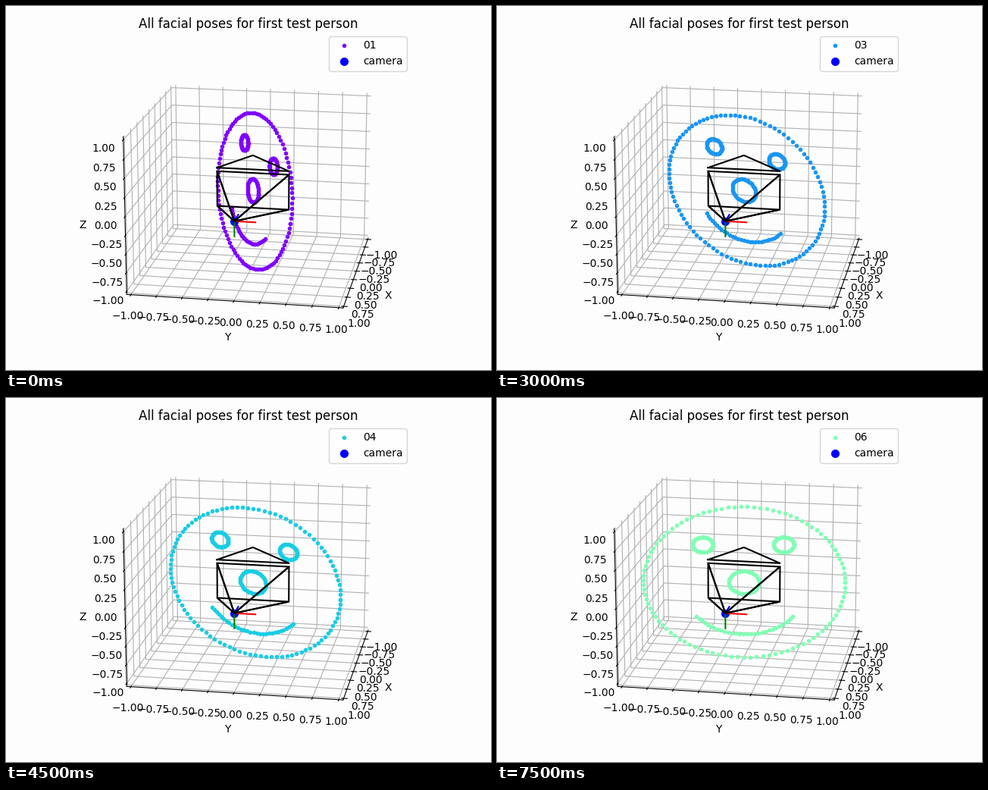
Write a matplotlib script that moves like this. It is 640 by 480 pixels and loops after 8 s.

```python
import numpy as np
import matplotlib.pyplot as plt
from matplotlib.animation import FuncAnimation

W, H, DPI = 640, 480, 100
STEP_MS, STEPS, HOLD = 500, 16, 3
BACK = "#fdfdfd"

# yaw in degrees, pitch and roll in radians
POSES = [
    (59.2, 0.10, -0.050),
    (42.3, 0.03, -0.029),
    (29.8, 0.015, -0.015),
    (22.9, 0.02, -0.006),
    (10.8, 0.06, 0.030),
    (-7.0, 0.10, 0.020),
]
COLORS = plt.cm.rainbow(np.linspace(0, 1, 11))


def arc(cx, cy, r, start=0, stop=2 * np.pi, n=100):
    a = np.linspace(start, stop, n)
    return np.array([cx + r * np.cos(a), cy + r * np.sin(a)])


def smiley():
    down, half = -np.pi / 2, np.radians(52.8)
    return np.hstack([
        arc(0, 0, 1),
        arc(-0.4, 0.5, 0.1, n=50),
        arc(0.4, 0.5, 0.1, n=50),
        arc(0, 0, 0.15, n=50),
        arc(0, -0.09, 0.6, down - half, down + half, 30),
    ])


def posed(face, yaw, pitch, roll):
    c, s = np.cos(np.radians(yaw)), np.sin(np.radians(yaw))
    side = np.array([s, c, 0])
    front = np.array([c, -s, 0])
    up = np.cos(pitch) * np.array([0, 0, 1]) - np.sin(pitch) * front
    right = np.cos(roll) * side + np.sin(roll) * up
    top = np.cos(roll) * up - np.sin(roll) * side
    return np.outer(right, face[0]) + np.outer(top, face[1])


def line(points, color="black", width=1.5):
    ax.plot(*np.array(points, float).T, color=color, lw=width, zorder=5)


def draw_camera(eye, w=0.36, h=0.24, axis=0.2):
    for step, color in [((0, axis, 0), "red"), ((0, 0, -axis), "green"),
                        ((-axis, 0, 0), "blue")]:
        line([eye, np.add(eye, step)], color)
    corners = [(0, -w, h), (0, w, h), (0, w, -h), (0, -w, -h)]
    for a, b in zip(corners, corners[1:] + corners[:1]):
        line([eye, a, b, eye])
    roof = 1.2 * h
    line([(0, -w, roof), (0, 0, 2 * h), (0, w, roof), (0, -w, roof)])


fig = plt.figure(figsize=(W / DPI, H / DPI), dpi=DPI, facecolor=BACK)
ax = fig.add_axes([104 / W, 15 / H, 432 / W, 432 / H], projection="3d",
                  facecolor=BACK)
ax.view_init(elev=17, azim=10)

limit = 1 + 1 / 24
ticks = np.linspace(-1, 1, 9)
ax.set(xlim=(-limit, limit), ylim=(-limit, limit), zlim=(-limit, limit),
       xticks=ticks, yticks=ticks, zticks=ticks,
       xlabel="X", ylabel="Y", zlabel="Z")
for axis in (ax.xaxis, ax.yaxis, ax.zaxis):
    axis.set_major_formatter("{x:.2f}")
    axis.set_pane_color((1, 1, 1, 0))

fig.text(0.5, 1 - 29 / H, "All facial poses for first test person",
         ha="center", va="baseline", fontsize=12)

face = smiley()
dots, = ax.plot([], [], [], ".", ms=6, label="01", zorder=3)
ax.plot([1], [0], [0], "o", color="blue", ms=7, label="camera", zorder=4)
draw_camera((1, 0, 0))
legend = ax.legend(loc="upper right")
key, name = legend.legend_handles[0], legend.get_texts()[0]


def update(step):
    i = step // HOLD
    dots.set_data_3d(*posed(face, *POSES[i]))
    dots.set_color(COLORS[i])
    key.set_color(COLORS[i])
    name.set_text(f"{i + 1:02d}")
    return dots, key, name


anim = FuncAnimation(fig, update, frames=STEPS, interval=STEP_MS,
                     init_func=lambda: update(0), repeat=True, repeat_delay=0)
plt.show()
```
